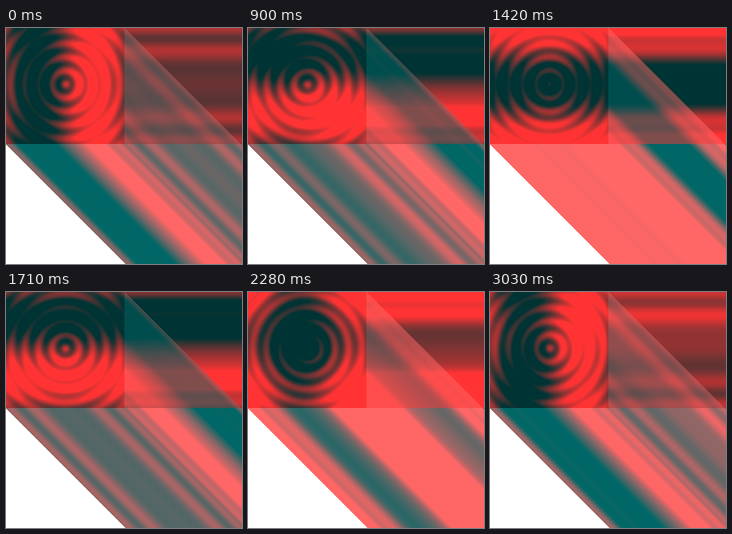
Write an HTML page with a canvas that moves like this. It is 295 px wide and 295 px high and loops after 3090 ms.

```html
<!DOCTYPE html>
<html>
<head>
<meta charset="utf-8">
<style>
  html, body { margin: 0; width: 100%; height: 100%; overflow: hidden; background: #fff; }
  canvas { display: block; width: 100vw; height: 100vh; }
</style>
</head>
<body>
<canvas id="stage" width="295" height="295"></canvas>
<script>
const SIZE = 295, W = 148, H = 145, CX = 74, CY = 70;
const LOOP = 3090, HOLD = 150, STEPS = 52, ROUNDING = 6;
const ctx = document.getElementById('stage').getContext('2d');
const img = ctx.createImageData(SIZE, SIZE);
const TAU = 2 * Math.PI, K = TAU / 150, RING = TAU / 17;

// step, balance between the x and y waves (radians), phase (multiples of pi)
const KEYS = [
  [0, 0, 0], [7, 0.79, 1], [14, 1.3, 2], [23, 1.57, 3.5],
  [33, 1.57, 4.5], [43, -0.25, 6.8], [51, -0.2, 7.94], [52, 0, 8]
];

function pose(n) {
  const i = KEYS.findIndex(k => k[0] > n);
  const a = KEYS[i - 1], b = KEYS[i], f = (n - a[0]) / (b[0] - a[0]);
  return [1, 2].map(j => a[j] + (b[j] - a[j]) * f);
}

function draw(n) {
  const [balance, phase] = pose(n);
  const ax = 1.3 * Math.cos(balance), ay = 1.3 * Math.sin(balance), shift = phase * Math.PI;

  // red level: one wave along x, one along y, and fixed fading rings
  const red = (x, y) => {
    const dx = x - CX, dy = y - CY, r = Math.hypot(dx, dy);
    const wave = ax * Math.sin(K * dx + shift) + ay * Math.sin(K * dy + shift);
    const v = wave + 0.6 * Math.exp(-r / 150) * Math.cos(RING * r);
    return Math.max(0, Math.min(255, 127.5 * (1 + v)));
  };
  const side = Array.from({ length: H + 1 }, (_, y) => red(W, y));
  const base = Array.from({ length: W }, (_, x) => red(x, H));

  const shade = (x, y) => {
    if (x < W && y < H) return [red(x, y), 51];
    const d = y - (x - W);
    if (x >= W && y < H) return d < 0 ? [side[y], 51] : [(side[y] + side[d]) / 2, 77];
    if (x >= W && d <= H) return [side[d], 102];
    const s = x - (y - H);
    return s >= 0 && s < W ? [base[s], 102] : [255, 255];
  };

  for (let y = 0, p = 0; y < SIZE; y++) {
    for (let x = 0; x < SIZE; x++, p += 4) {
      const [r, g] = shade(x, y);
      img.data[p] = r;
      img.data[p + 1] = img.data[p + 2] = g;
      img.data[p + 3] = 255;
    }
  }
  ctx.putImageData(img, 0, 0);
}

const start = performance.now();
let shown = -1;
function tick() {
  const t = (performance.now() - start) % LOOP;
  const step = Math.floor((t - HOLD + ROUNDING) / (LOOP - HOLD) * (STEPS - 1));
  const n = t < HOLD ? 0 : Math.min(STEPS - 1, 1 + step);
  if (n !== shown) draw(shown = n);
  requestAnimationFrame(tick);
}
tick();
</script>
</body>
</html>
```
